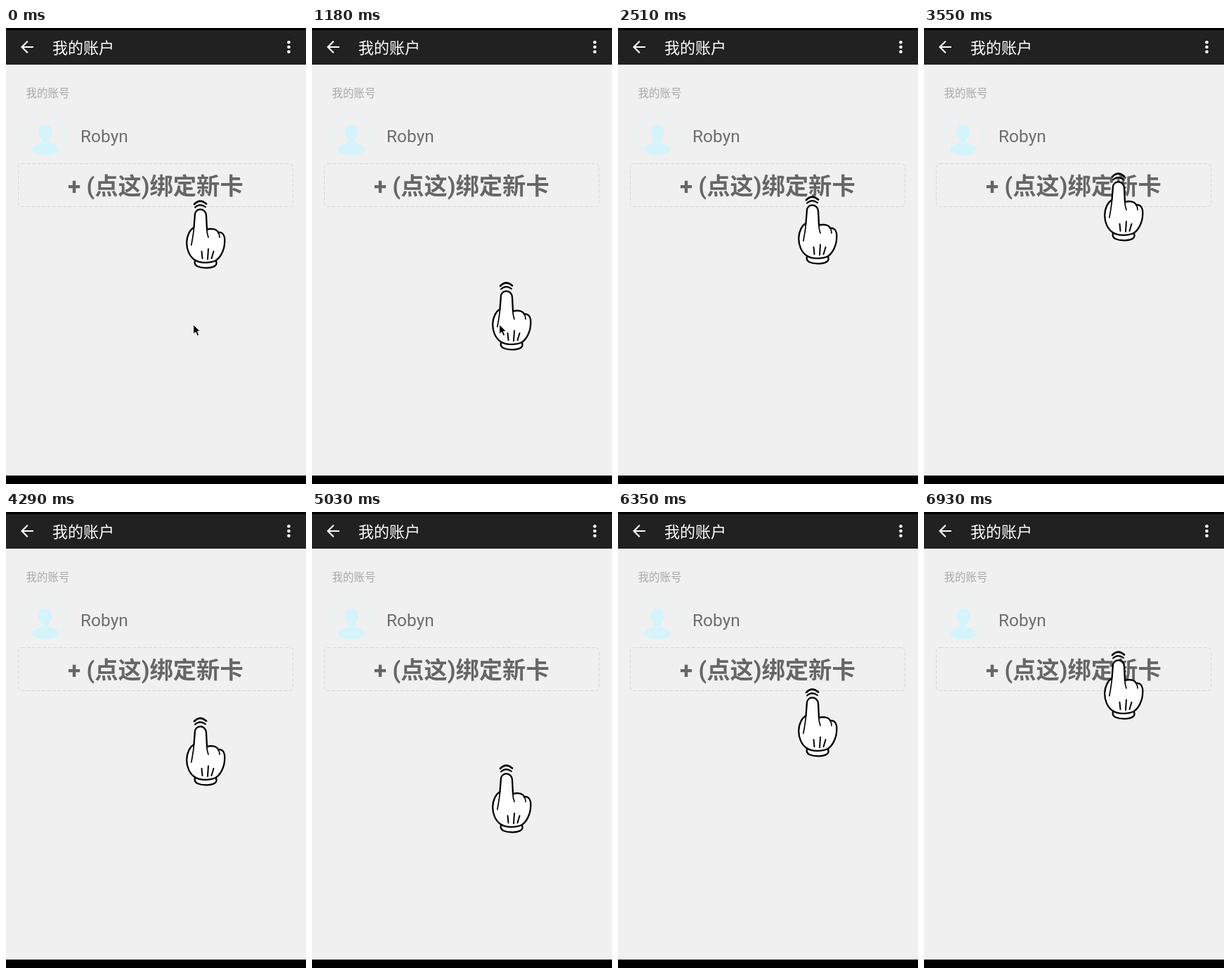
These frames come from a looping animation (427 by 647 pixels, 7.03 s). An HTML page:

```html
<!DOCTYPE html>
<html lang="zh-CN">
<head>
<meta charset="utf-8">
<title>我的账户</title>
<style>
  html, body { margin: 0; width: 100%; height: 100%; overflow: hidden; background: #f0f0f0; }
  svg { display: block; width: 427px; height: 647px; }
  text { font-family: Roboto, "Noto Sans CJK SC", "Noto Sans CJK", sans-serif; }
  .line { fill: none; stroke: #000; stroke-linecap: round; stroke-linejoin: round; }
</style>
</head>
<body>
<svg viewBox="0 0 427 647">
  <rect width="427" height="647" fill="#f0f0f0"/>
  <rect width="427" height="52" fill="#212121"/>
  <rect width="427" height="3"/>
  <rect y="635" width="427" height="12"/>

  <path d="M39 27H23M30.800 18.800L22.600 27L30.800 35.200" fill="none" stroke="#fff" stroke-width="2.2"/>
  <g fill="#fff">
    <circle cx="402.5" cy="20.2" r="2.3"/>
    <circle cx="402.5" cy="27" r="2.3"/>
    <circle cx="402.5" cy="33.8" r="2.3"/>
  </g>
  <text x="66" y="36" font-size="22" font-weight="500" fill="#fff">我的账户</text>
  <text x="28.5" y="97.5" font-size="15.5" font-weight="500" fill="#a9a9a9">我的账号</text>

  <circle cx="56" cy="152.5" r="28.5" fill="none" stroke="#e6f2f5" stroke-width="2"/>
  <g fill="#d5f3fa">
    <path d="M56 137C62 137 65.500 140 65 147C67 147 66 152 64 152.500C63 156 61 158 60.500 160L60 163H52L51.500 160C51 158 49 156 48 152.500C46 152 45 147 47 147C46.500 140 50 137 56 137Z"/>
    <path d="M37 174C37 167 45 165.500 51 162.500Q56 166 61 162.500C67 165.500 75 167 75 174Q68 180.500 56 180.500T37 174Z"/>
  </g>
  <text x="106" y="162" font-size="24.5" fill="#6e6e6e">Robyn</text>

  <rect x="17.5" y="192.5" width="391" height="61" rx="5" fill="none" stroke="#d6d6d6" stroke-dasharray="5 2.5"/>
  <text x="88" y="236" font-size="33.3" font-weight="700" fill="#666">+ (点这)绑定新卡</text>

  <g id="hand">
    <path class="line" stroke-width="2.6" d="M12 6Q20 -2.500 29 5.500"/>
    <path class="line" stroke-width="2" d="M13 10.500Q20 4 28 10"/>
    <path class="line" style="fill:#fff" stroke-width="2.3" d="M13 86C12 89 13 92 16 94C24 97.500 37 97 42 93C44 91 44 88 42 85Z"/>
    <path class="line" style="fill:#fff" stroke-width="2.3" d="M12.800 22C12.500 10.500 28.500 10.500 29 22L30 42C36 40 44 41 46 46C53 45 56 51 55.200 60C55 71 49 82 42.500 86C34 90 20 90 12.500 85C5 80 1 70 1.200 60C1.500 50 6 42 11.500 39Z"/>
    <path class="line" stroke-width="1.7" d="M11.500 39C11 48 9 57 7.800 64M30 42Q29.700 47 32 53M46 46Q48 49 48 53"/>
    <path class="line" stroke-width="2" d="M22.500 73L23.500 83M32 69.500L31 84M39.500 73L36.500 83"/>
  </g>
  <g id="cursor">
    <path d="M.7 .7V14.500L3.900 11.500L6.200 16.800L8.700 15.700L6.500 10.600H10.700Z" stroke="#fff" stroke-width="1"/>
  </g>
</svg>
<script>
  const LOOP = 7030;

  // Each group: start, end, number of equal steps on a 10 ms grid.
  const groups = [
    [0, 1180, 8], [1180, 2360, 8], [2360, 3550, 8],
    [3550, 4730, 8], [4730, 5910, 8], [5910, 6930, 7]
  ];
  const times = groups.flatMap(([from, to, n]) =>
    Array.from({ length: n }, (_, i) => from + Math.round((to - from) * i / n / 10) * 10));
  times.push(6930);

  const handY = t => {
    const phase = (67.25 + 0.0915 * t) * Math.PI / 180;
    return Math.floor(276.8 - 83.6 * Math.cos(phase));
  };

  // Plays [time, x, y, opacity] poses, each held until the next.
  function play(id, poses) {
    const frames = poses.map(([t, x, y, opacity = 1]) => ({
      offset: t / LOOP,
      transform: `translate(${x}px, ${y}px)`,
      opacity,
      easing: 'step-end'
    }));
    frames.push({ ...frames[frames.length - 1], offset: 1 });
    const anim = document.getElementById(id).animate(frames, { duration: LOOP, iterations: Infinity });
    anim.startTime = document.timeline.currentTime;
  }

  play('hand', times.map(t => [t, 256, handY(t)]));
  play('cursor', [
    [0, 266, 420],
    [1480, 275, 440],
    [1620, 306, 520],
    [1770, 353, 617],
    [1920, 353, 617, 0]
  ]);
</script>
</body>
</html>
```
